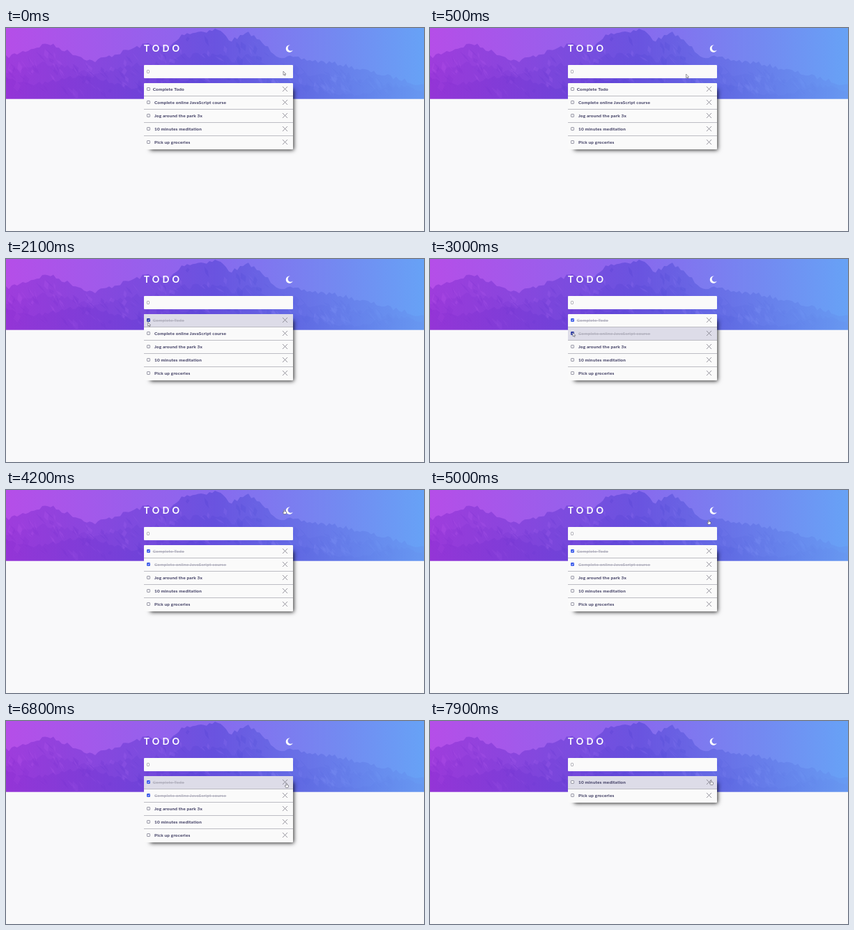
These frames come from a looping animation (600 px wide and 291 px high, 8000 ms). An HTML page:

```html
<!DOCTYPE html>
<html lang="en">
<head>
<meta charset="utf-8">
<title>Todo</title>
<style>
html, body { margin: 0; width: 100%; height: 100%; overflow: hidden; background: #f9f9fa; }
body { position: relative; font-family: Lato, sans-serif; }
svg, h1, .input, ul { position: absolute; margin: 0; padding: 0; }
svg { left: 0; top: 0; }
h1 { left: 198px; top: 20px; font: 700 13px/19px Lato, sans-serif; letter-spacing: 4.2px; color: #fff; }
.input { left: 198px; top: 53px; width: 214px; height: 19px; background: #fafafa; border-radius: 1px; }
ul { left: 198px; top: 79px; width: 214px; list-style: none; background: #fafafa; border-radius: 1px;
  box-shadow: 5px 5px 6px -4px rgba(0, 0, 0, .85); }
li { position: relative; height: 18px; border-bottom: 1px solid #bcbcc3; padding-left: 15px;
  font: 700 6.4px/18px Lato, sans-serif; letter-spacing: .18px; color: #37355c; white-space: nowrap; }
li:first-child { border-radius: 1px 1px 0 0; }
li:last-child { border-bottom-color: transparent; }
li.first { padding-left: 12.7px; }
li.hover { background: #dddce8; }
li.done span { color: #b4b3c0; text-decoration: line-through; }
.box { position: absolute; left: 4px; top: 6px; width: 3px; height: 3px; border: 1px solid #9a9aa8;
  border-radius: 1px; background: #fff; }
.input .box { top: 7px; width: 2px; border-color: #b4b4ba; }
.done .box { background: #3b5bea; border-color: #3b5bea; }
.done .box.over { background: #2b3ba6; border-color: #2b3ba6; }
li svg { overflow: visible; fill: none; }
.cross { left: 199.3px; top: 5.3px; stroke: #6f6e79; stroke-width: .7; }
.box svg { display: none; stroke: #fff; stroke-width: .8; }
.done .box svg { display: block; }
</style>
</head>
<body>
<svg width="600" height="102" viewBox="0 0 600 102">
  <defs>
    <linearGradient id="sky" gradientUnits="userSpaceOnUse" x2="600">
      <stop stop-color="#b54ee8"/><stop offset=".5" stop-color="#8869ee"/>
      <stop offset=".8" stop-color="#738af1"/><stop offset="1" stop-color="#67a2f6"/>
    </linearGradient>
    <linearGradient id="rock" gradientUnits="userSpaceOnUse" x2="600">
      <stop stop-color="#8c2ed2"/><stop offset=".5" stop-color="#5142d4"/>
      <stop offset="1" stop-color="#6796f0"/>
    </linearGradient>
  </defs>
  <rect width="600" height="101.5" fill="url(#sky)"/>
  <g id="hills"></g>
</svg>
<h1>TODO</h1>
<div class="input"><i class="box"></i></div>
<ul id="list"></ul>
<svg width="600" height="291">
  <path transform="translate(401.8 24.4)" fill="#fff" d="M6.1.1A5.2 5.2 0 1 0 10 7.1 4.2 4.2 0 1 1 6.1.1Z"/>
  <path id="cursor" fill="#fff" stroke="#55545f" stroke-width=".6" stroke-linejoin="round"/>
</svg>
<script>
const $ = id => document.getElementById(id);
let seed = 7;
const rand = () => (seed = seed * 16807 % 2147483647) / 2147483647;
const mix = (a, b, p) => a + (b - a) * p;

// Main summits and saddles of the skyline
const peaks = [[0, 42], [60, 22], [125, 48], [205, 22], [232, 30], [255, 8], [305, 2],
  [322, 18], [350, 7], [390, 40], [480, 52], [600, 82]];

function skyline(x) {
  const i = Math.max(1, peaks.findIndex(p => p[0] >= x));
  const [a, b] = [peaks[i - 1], peaks[i]];
  return mix(a[1], b[1], (x - a[0]) / (b[0] - a[0]));
}

function ridge(height, rough, opacity) {
  let d = 'M0 101.5';
  for (let x = 0; x <= 600; x += 4) d += `L${x} ${height(x) + (rand() - .5) * rough}`;
  return `<path d="${d}L600 101.5Z" fill="url(#rock)" opacity="${opacity}"/>`;
}

// Slanted gullies, alternately lit and shaded
function gullies(count) {
  let out = '';
  for (let i = 0; i < count; i++) {
    const x = rand() * 560, y = mix(skyline(x) + 5, 88, rand());
    const w = 2 + rand() * 6, h = 6 + rand() * 12, lean = mix(-4, 9, rand());
    const [fill, opacity] = i % 2 ? ['sky', .3] : ['rock', .3];
    out += `<path d="M${x} ${y}l${w} ${h * .4} ${lean} ${h * .6} ${-w} ${-h * .4}Z"
      fill="url(#${fill})" opacity="${opacity}"/>`;
  }
  return out;
}

const foothills = x => 72 + x / 30 + 7 * Math.sin(x / 24);
$('hills').innerHTML = ridge(skyline, 6, .55) + ridge(x => mix(skyline(x), 100, .35), 9, .25) +
  gullies(240) + ridge(foothills, 6, .4);

const tasks = ['Complete Todo', 'Complete online JavaScript course', 'Jog around the park 3x',
  '10 minutes meditation', 'Pick up groceries'];
const isDone = (i, t) => i < 2 && t >= 1700 + 900 * i;
const isGone = (i, t) => i < 3 && t >= 7100 + 300 * i;

const rows = tasks.map((text, i) => {
  const li = document.createElement('li');
  if (!i) li.className = 'first';
  li.innerHTML = `<i class="box"><svg width="3" height="3"><path d="M.2 1.6l1 1L2.9.5"/></svg></i>
    <span>${text}</span><svg class="cross" width="7" height="7"><path d="M0 0l7 7M7 0L0 7"/></svg>`;
  $('list').append(li);
  return li;
});

const arrow = 'M0 0V5.5L1.3 4.4 2.2 6.3 3.1 5.9 2.2 4.1H3.9Z';
const hand = 'M-.6.5Q0-.3.6.5V2.6L3 3.2V5L2.3 6.6H-.8L-2.2 3.9-1.4 3.5-.6 4.3Z';
// start, duration, and the place the pointer tip moves to
const moves = [[300, 800, 203.5, 88], [2000, 400, 205, 105.5], [3200, 900, 399.5, 28],
  [4700, 1000, 402, 96], [5900, 700, 402.5, 89], [7000, 400, 403.5, 85]];

function pointer(t) {
  return moves.reduce(([x, y], [start, length, toX, toY]) => {
    const p = Math.min(1, Math.max(0, (t - start) / length)), e = p * p * (3 - 2 * p);
    return [mix(x, toX, e), mix(y, toY, e)];
  }, [398, 62]);
}

function draw(now) {
  const t = Math.floor(now % 8000 / 100) * 100;
  const [x, y] = pointer(t);
  const inside = x >= 198 && x < 412;
  let top = 79;
  rows.forEach((row, i) => {
    const gone = isGone(i, t);
    const hover = !gone && inside && y >= top && y < top + 19;
    row.style.display = gone ? 'none' : '';
    row.classList.toggle('hover', hover);
    row.classList.toggle('done', isDone(i, t));
    row.firstChild.classList.toggle('over', hover && x < 208);
    if (!gone) top += 19;
  });
  $('cursor').setAttribute('d', t >= 4000 ? hand : arrow);
  $('cursor').setAttribute('transform', `translate(${x} ${y})`);
  requestAnimationFrame(draw);
}
draw(0);
</script>
</body>
</html>
```
